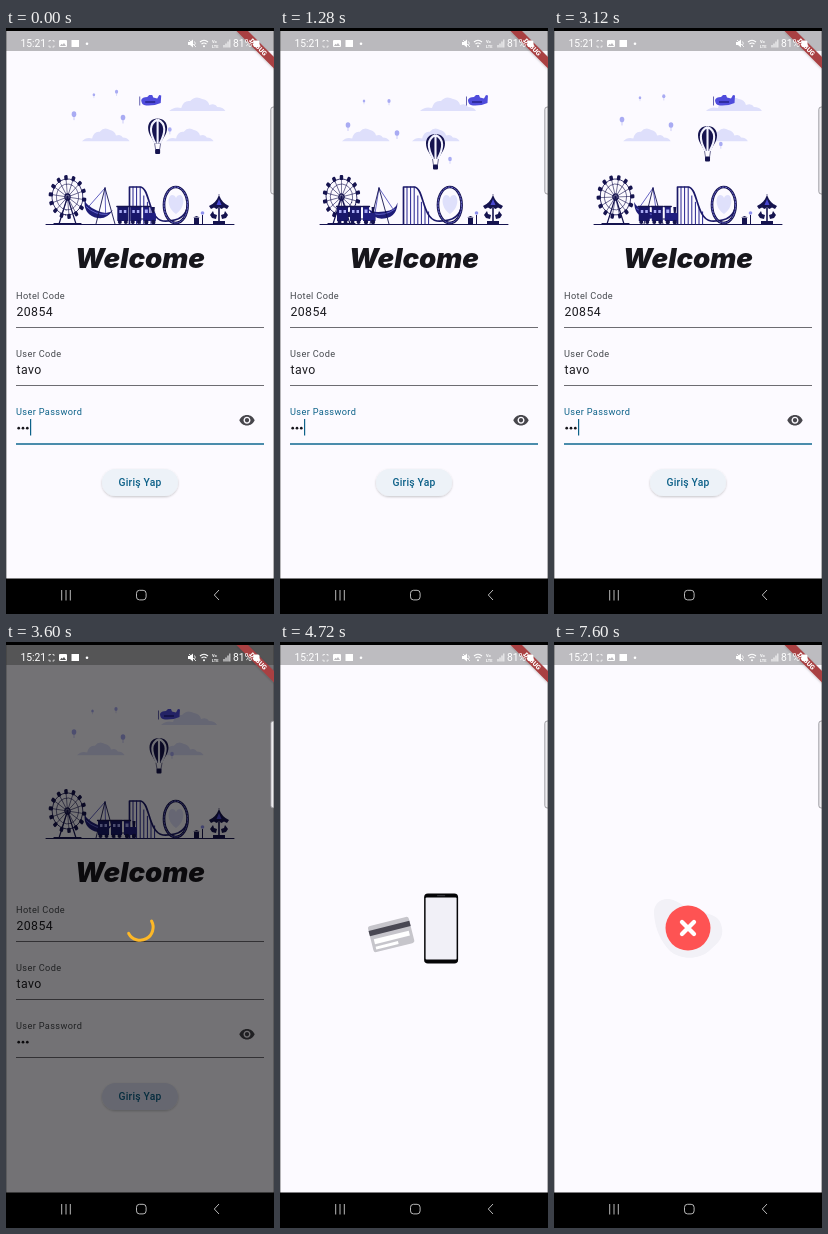
An HTML page for the animation above (8 s loop, 268 by 586 pixels).

```html
<!DOCTYPE html>
<html lang="tr">
<head>
<meta charset="utf-8">
<title>Login flow</title>
<style>
html, body { margin: 0; width: 100%; height: 100%; overflow: hidden; background: #fcfaff; }
svg { display: block; width: 100vw; height: 100vh; }
text { font-family: Roboto, "Noto Sans", sans-serif; }
.label { font-size: 9.2px; letter-spacing: .36px; fill: #45484d; }
.value { font-size: 12.3px; letter-spacing: .4px; fill: #1c1b20; }
.tiny { font-size: 3px; }
.title { font: italic 900 27.6px Inter, "Open Sans", sans-serif; fill: #17161c; }
</style>
</head>
<body>
<svg viewBox="0 0 268 586" preserveAspectRatio="none">
  <defs>
    <filter id="soft" x="-20%" y="-30%" width="140%" height="180%">
      <feDropShadow dx="0" dy="1" stdDeviation=".8" flood-color="#000" flood-opacity=".22"/>
    </filter>
    <path id="cloud" d="M0 14Q5 9 12 11Q14 3 21 4Q26-2 33 2Q39 3 40 8Q46 6 48 10Q54 10 56 14Z" fill="#dedffb"/>
    <g id="mini"><ellipse rx="2.3" ry="2.8" fill="#a9abf3"/><path d="M0 2.8V6" stroke="#a9abf3" stroke-width=".6"/></g>
  </defs>
  <rect width="268" height="586" fill="#fcfaff"/>

  <g id="login">
    <g id="sky">
      <use id="cloudA" href="#cloud"/><use id="cloudB" href="#cloud"/><use id="cloudC" href="#cloud"/>
      <g id="minis"></g>
      <g id="plane">
        <path d="M-9-1Q-8-4-3-4L-1-6H2L3-3.500 7-2.500 9-6 11-5.500 10.500 2Q4 5-4 4.500Q-9 4-9-1Z" fill="#4f4cdc"/>
        <path d="M-5 1H5" stroke="#25228e" stroke-width="1.500"/>
        <path d="M-10.500-4.500V4.500" stroke="#25228e" stroke-width=".7"/>
      </g>
      <g id="balloon">
        <path d="M0 0C6 0 9.500 4 9.500 9.500C9.500 16 5 20 3 25H-3C-5 20-9.500 16-9.500 9.500C-9.500 4-6 0 0 0Z" fill="#15134f"/>
        <path d="M0 1C-9 5-8 14-2.200 25M0 1C9 5 8 14 2.200 25M0 1V25" fill="none" stroke="#f4f4ff" stroke-width="2.100"/>
        <path d="M-3 25L-2 31M3 25L2 31" stroke="#15134f" stroke-width=".6"/>
        <rect x="-2.500" y="30.500" width="5" height="5" rx="1" fill="#15134f"/>
      </g>
    </g>
    <g id="park" stroke-linecap="round" stroke-linejoin="round">
      <path d="M40 196.500H228" stroke="#15134f"/>
      <g fill="none" stroke="#15134f">
        <path d="M61.500 169L53 196M61.500 169L70 196M48 195.500H75" stroke-width="1.200"/>
        <g id="wheel"></g>
      </g>
      <g id="ship">
        <path d="M0 0L-9 23M0 0L9 23" stroke="#3735b0" stroke-width=".7"/>
        <path d="M-15 18Q-12 23 0 24T15 18Q12 31 0 31T-15 18Z" fill="#1e1c78"/>
        <path d="M-11 24Q0 29 11 24" fill="none" stroke="#7476e0" stroke-width=".7"/>
      </g>
      <path d="M99 160L90 196M99 160L109 196" stroke="#15134f" stroke-width=".9"/>
      <g id="coaster" fill="none" stroke="#25238f"></g>
      <path d="M123.500 196V159H134C144 159 142 191 157 193Q180 194 181.500 177" fill="none" stroke="#1b1969" stroke-width="1.700"/>
      <ellipse cx="169.800" cy="177" rx="11.800" ry="18" fill="none" stroke="#15134f" stroke-width="2.700"/>
      <ellipse cx="169.800" cy="177" rx="11.800" ry="18" fill="none" stroke="#7674e0" stroke-width=".9" stroke-dasharray="1.500 1.500"/>
      <path d="M170 186C161 180 161 168 166 167Q169 167 170 170Q171 167 174 167C179 168 179 180 170 186Z" fill="#dfe0fb"/>
      <g fill="#15134f">
        <path d="M188 196V190H193V196ZM187 189.500L190.500 188 194 189.500Z"/>
        <circle cx="196.500" cy="185" r="1.800" fill="#8f91ee"/><path d="M196 187H197V196H196Z"/>
        <path d="M203 178Q210 175 212.500 168H213.500Q216 175 223 178L221 181 218 179.500 215.500 181 213 179.500 210.500 181 208 179.500 205 181ZM212.700 166H213.300V169H212.700ZM207 193H219V196H207ZM212.200 180H213.800V194H212.200Z"/>
        <path d="M204 187L207 183 208 186 211 187 210 191 206 190ZM215 187L218 186 219 183 222 187 220 190 216 191Z"/>
        <path d="M210.500 177L213 171 215.500 177Z" fill="#4a48cf"/>
      </g>
      <g id="train"></g>
    </g>
    <text class="title" x="134" y="240" text-anchor="middle">Welcome</text>
    <g id="fields"></g>
    <g fill="#17161c"><circle cx="12.700" cy="400.200" r="1.350"/><circle cx="17" cy="400.200" r="1.350"/><circle cx="21.300" cy="400.200" r="1.350"/></g>
    <rect id="cursor" x="24" y="391" width="1.200" height="16.500" fill="#0d6289"/>
    <path transform="translate(232.600 383.800) scale(.7)" fill="#47464c" d="M12 4.500C7 4.500 2.730 7.610 1 12c1.730 4.390 6 7.500 11 7.500s9.270-3.110 11-7.500c-1.730-4.390-6-7.500-11-7.500zM12 17c-2.760 0-5-2.240-5-5s2.240-5 5-5 5 2.240 5 5-2.240 5-5 5zm0-8c-1.660 0-3 1.340-3 3s1.340 3 3 3 3-1.340 3-3-1.340-3-3-3z"/>
    <rect id="button" x="96" y="441" width="76" height="27" rx="13.500" fill="#edf2f8" filter="url(#soft)"/>
    <text x="134" y="458" text-anchor="middle" font-size="10.300" font-weight="500" letter-spacing=".2" fill="#0c6088">Giriş Yap</text>
  </g>

  <rect y="3" width="268" height="20" fill="#bab9bd"/>
  <g id="dim">
    <rect width="268" height="551" fill="#000" opacity=".54"/>
    <path id="spinner" d="M10.500-8.500A13 13 0 1 1-12.300 4" fill="none" stroke="#fdb827" stroke-width="3" stroke-linecap="round"/>
  </g>

  <g id="page">
    <rect y="3" width="268" height="548" fill="#fcfaff"/>
    <rect y="3" width="268" height="20" fill="#bdbcc0"/>
    <g id="card">
      <rect x="-21" y="-13.500" width="42" height="27" rx="2.500" fill="#c6c5cb"/>
      <path d="M-21-9H21V-3.500H-21Z" fill="#494853"/>
      <path d="M-18 .5H18V5.500H-18ZM-18 8H5V11H-18Z" fill="#fff"/>
    </g>
    <g id="phone">
      <rect width="34" height="70" rx="3.800" fill="#050507"/>
      <rect x="1.500" y="4" width="31" height="62" rx="1" fill="#f1f0f7"/>
      <path d="M13 2.200H21" stroke="#55545c" stroke-width=".7"/>
      <g id="form">
        <rect x="1.500" y="4" width="31" height="7" fill="#1192b5"/>
        <text class="tiny" x="6" y="8.800" fill="#fff">Passenger</text>
        <g fill="#fff" stroke="#e2e1ea" stroke-width=".4">
          <rect x="4" y="14" width="26.500" height="7.500" rx="2"/>
          <rect x="4" y="23.500" width="26.500" height="7" rx="2"/>
          <rect x="4" y="32.500" width="26.500" height="7" rx="2"/>
        </g>
        <text x="7" y="19.300" font-size="4" font-weight="500" fill="#222">Alva Rin</text>
        <text id="line2" class="tiny" x="7" y="28.200" fill="#444"></text>
        <text id="line3" class="tiny" x="7" y="37.200" fill="#444"></text>
        <rect id="pay" x="4" y="56.500" width="26.500" height="6.500" rx="3" fill="#e0245f"/>
        <text class="tiny" x="17.200" y="60.900" text-anchor="middle" font-weight="500" fill="#fff">Pay Request</text>
      </g>
    </g>
    <path id="blob" d="M-34-14C-35-24-27-30-19-29C-9-28-2-18 11-16C22-14 32-13 34 0C36 12 27 17 21 23C11 32-8 32-18 23C-26 15-33 2-34-14Z" fill="#f2f1f7"/>
    <g id="error">
      <circle r="22.500" fill="#fe5353"/>
      <path d="M-6-6L6 6M6-6L-6 6" stroke="#fff" stroke-width="4.300" stroke-linecap="round"/>
    </g>
  </g>

  <g id="chrome">
    <rect x="264.800" y="79" width="8" height="87" rx="2.500" fill="#eeedf1" stroke="#8b8a90" stroke-width=".8"/>
    <path d="M.2 3V551M267.800 3V551" stroke="#333" stroke-width=".5"/>
    <path d="M230.500 3H242L268 29V40.500Z" fill="#a93f42" filter="url(#soft)"/>
    <text transform="translate(252.500 19) rotate(45)" y="2.400" text-anchor="middle" font-size="6.600" font-weight="900" fill="#fff">DEBUG</text>
    <g fill="#fff">
      <text x="14.500" y="19" font-size="10.300">15:21</text>
      <path d="M43 14V12.500H45M46.500 12.500H48V14M48 17.500V19H46.500M45 19H43V17.500" fill="none" stroke="#fff" stroke-width=".7"/>
      <path fill-rule="evenodd" d="M54 12H60Q61 12 61 13V18Q61 19 60 19H54Q53 19 53 18V13Q53 12 54 12ZM54 18H60L58 15 56.500 16.800 55.500 15.800Z"/>
      <rect x="65.500" y="12" width="7.500" height="7"/>
      <circle cx="81" cy="15.700" r="1.300"/>
      <path d="M182 14H184L187 11.500V19.500L184 17H182Z"/>
      <path d="M183 12L190 19M188.500 13.500Q190 15.500 188.500 17" fill="none" stroke="#fff" stroke-width=".8"/>
      <path d="M194 14Q198 10.500 202 14M195.500 16Q198 14 200.500 16" fill="none" stroke="#fff" stroke-width="1.100"/>
      <circle cx="198" cy="18.300" r="1"/>
      <text x="206" y="15.200" font-size="4" font-weight="700">Vo</text>
      <text x="206" y="19.500" font-size="4" font-weight="700">LTE</text>
      <path d="M217.500 17H218.500V19.500H217.500ZM219.500 15.500H220.500V19.500H219.500ZM221.500 13.500H222.500V19.500H221.500ZM223.400 11.500H224.300V19.500H223.400Z"/>
      <text x="227" y="19" font-size="10.300">81%</text>
      <rect x="247.500" y="12.500" width="6" height="6.500" rx="1.500"/>
    </g>
    <rect width="268" height="3" fill="#000"/>
    <rect y="550.500" width="268" height="36" fill="#000"/>
    <g fill="none" stroke="#b9b9b9">
      <path d="M55.700 562V572.500M60 562V572.500M64.300 562V572.500M213 562L208.300 567 213 572"/>
      <rect x="130.500" y="562.300" width="9.600" height="9.600" rx="3"/>
    </g>
  </g>
</svg>
<script>
const LOOP = 8000;
const $ = id => document.getElementById(id);
const mix = (a, b, u) => a + (b - a) * u;
const clamp = u => Math.max(0, Math.min(1, u));
const span = (t, a, b) => clamp((t - a) / (b - a));
const ease = u => u * u * (3 - 2 * u);
const outBack = u => 1 + 2.2 * (u - 1) ** 3 + 1.2 * (u - 1) ** 2;
const place = (id, x, y, more = '') => $(id).setAttribute('transform', `translate(${x} ${y}) ${more}`);
const show = (id, on) => { $(id).style.display = on ? '' : 'none'; };

// Static repeated parts
$('fields').innerHTML = [['Hotel Code', '20854'], ['User Code', 'tavo'], ['User Password', '']].map(([name, value], i) => {
  const y = 271 + i * 58;
  return `<text class="label" x="10" y="${y}">${name}</text><text class="value" x="10.500" y="${y + 17}">${value}</text>
    <path d="M10 ${y + 28.5}H258" stroke="#6d6c72"/>`;
}).join('');
const passLabel = $('fields').querySelectorAll('.label')[2];
const passLine = $('fields').querySelectorAll('path')[2];

let wheel = '<circle r="18" stroke-width=".8"/><circle r="13" stroke-width=".6"/><circle r="3" stroke-width="1.400"/>';
for (let i = 0; i < 14; i++) {
  wheel += `<g transform="rotate(${i * 360 / 14})"><path d="M0 0V-18" stroke-width=".6"/><rect x="-2" y="-22" width="4" height="5" rx="1.200" fill="#15134f" stroke="none"/></g>`;
}
$('wheel').innerHTML = wheel;

let posts = '';
for (let x = 127; x < 152; x += 3.6) {
  const top = x < 136 ? 159 : 159 + 33 * Math.pow((x - 135) / 21, .65);
  posts += `M${x} 196V${top}`;
}
$('coaster').innerHTML = `<path d="${posts}"/>`;

const wagon = x => `<path d="M${x} 179H${x + 11}V193H${x}Z" fill="#19176a"/><path d="M${x - .5} 178.500H${x + 11.5}" stroke="#15134f" stroke-width="1.300"/>
  <path d="M${x + 2} 182H${x + 4.5}V185H${x + 2}ZM${x + 6.5} 182H${x + 9}V185H${x + 6.5}Z" fill="#a9abf3"/>
  <circle cx="${x + 2.5}" cy="194" r="2" fill="#15134f"/><circle cx="${x + 8.5}" cy="194" r="2" fill="#15134f"/>`;
$('train').innerHTML = wagon(-19) + wagon(-6) + `<path d="M5 191H8" stroke="#15134f"/>
  <path d="M7 179H13V185H19Q20 187 19.500 193H7Z" fill="#201e80"/><path d="M6.500 178.500H13.500" stroke="#15134f" stroke-width="1.300"/>
  <path d="M15.500 179H18.500L18 185H16Z" fill="#15134f"/><path d="M8.500 181.500H11.500V185H8.500Z" fill="#a9abf3"/>
  <circle cx="10" cy="194" r="2.200" fill="#15134f"/><circle cx="17" cy="194" r="2.200" fill="#15134f"/>`;

// Small balloons: x and y at both ends of the drift, then size
const drift = [
  [68, 97, 68, 90, 1], [117, 105, 117, 95, 1], [84, 73, 86.500, 69, .55],
  [109, 73, 110, 67, .7], [170, 131, 166, 112, .8]
];
$('minis').innerHTML = drift.map(() => '<use href="#mini"/>').join('');
const minis = [...$('minis').children];

function drawPark(t) {
  const phase = t < 500 ? t + 4880 : t;
  const u = (phase - 1280) / 2320;
  place('cloudA', mix(140, 155, u), 69);
  place('cloudB', mix(62, 71, u), 100, 'scale(.85 .95)');
  place('cloudC', mix(132, 150, u), 100, 'scale(.85 .95)');
  place('plane', mix(197, 163, u), 73);
  place('balloon', mix(155.5, 153, u), mix(106, 96, u));
  drift.forEach(([x0, y0, x1, y1, s], i) =>
    minis[i].setAttribute('transform', `translate(${mix(x0, x1, u)} ${mix(y0, y1, u)}) scale(${s})`));
  place('train', mix(76, 111, u), 0);
  place('wheel', 61.5, 169, `scale(.86 1) rotate(${phase * .02})`);
  place('ship', 99, 160, `rotate(${20 * Math.cos(t / 3600 * 2 * Math.PI)})`);
}

function drawForm(t) {
  const focus = t < 3440;
  passLabel.style.fill = focus ? '#0d6289' : '';
  passLine.setAttribute('stroke', focus ? '#0f6790' : '#6d6c72');
  passLine.setAttribute('stroke-width', focus ? 1.6 : 1);
  passLine.setAttribute('transform', `translate(0 ${focus ? .5 : 0})`);
  show('cursor', focus && (t + 50) % 1000 < 550);
  $('button').setAttribute('fill', t < 3360 ? '#edf2f8' : '#dfe2f5');
  show('dim', t >= 3600);
  place('spinner', 135, 287.5, `rotate(${(t - 3600) * .36})`);
}

const typed = (s, t, a, b) => s.slice(0, Math.round(s.length * span(t, a, b)));

function drawPage(t) {
  const enter = span(t, 3900, 4180);
  const s = mix(.9, 1, 1 - (1 - enter) ** 3);
  show('page', enter > 0);
  $('page').setAttribute('opacity', span(t, 3900, 4020));
  place('page', 134 * (1 - s), 293 * (1 - s), `scale(${s})`);

  const slide = ease(span(t, 4160, 5240));
  const gone = span(t, 6840, 6960);
  place('card', mix(95, 125.5, slide), mix(292, 293, slide), 'rotate(-14)');
  place('phone', mix(163, 127.3, slide), 251.5);
  for (const id of ['card', 'phone']) $(id).setAttribute('opacity', 1 - gone);
  $('form').setAttribute('opacity', span(t, 5040, 5360));
  $('line2').textContent = typed('4821 7035', t, 5720, 6120);
  $('line3').textContent = typed('09/27', t, 6120, 6400);
  $('pay').setAttribute('fill', t >= 6400 && t < 6560 ? '#b81a4c' : '#e0245f');

  const grow = ease(span(t, 7160, 7440));
  const pop = span(t, 7380, 7600);
  show('blob', grow > 0);
  show('error', pop > 0);
  place('blob', 134, 286, `scale(${grow})`);
  place('error', 134, 286, `scale(${outBack(pop)})`);
}

function draw(t) {
  const login = t < 4180;
  show('login', login);
  if (login) drawPark(t);
  drawForm(t);
  drawPage(t);
}

const start = performance.now();
function tick() {
  draw((performance.now() - start) % LOOP);
  requestAnimationFrame(tick);
}
tick();
</script>
</body>
</html>
```
